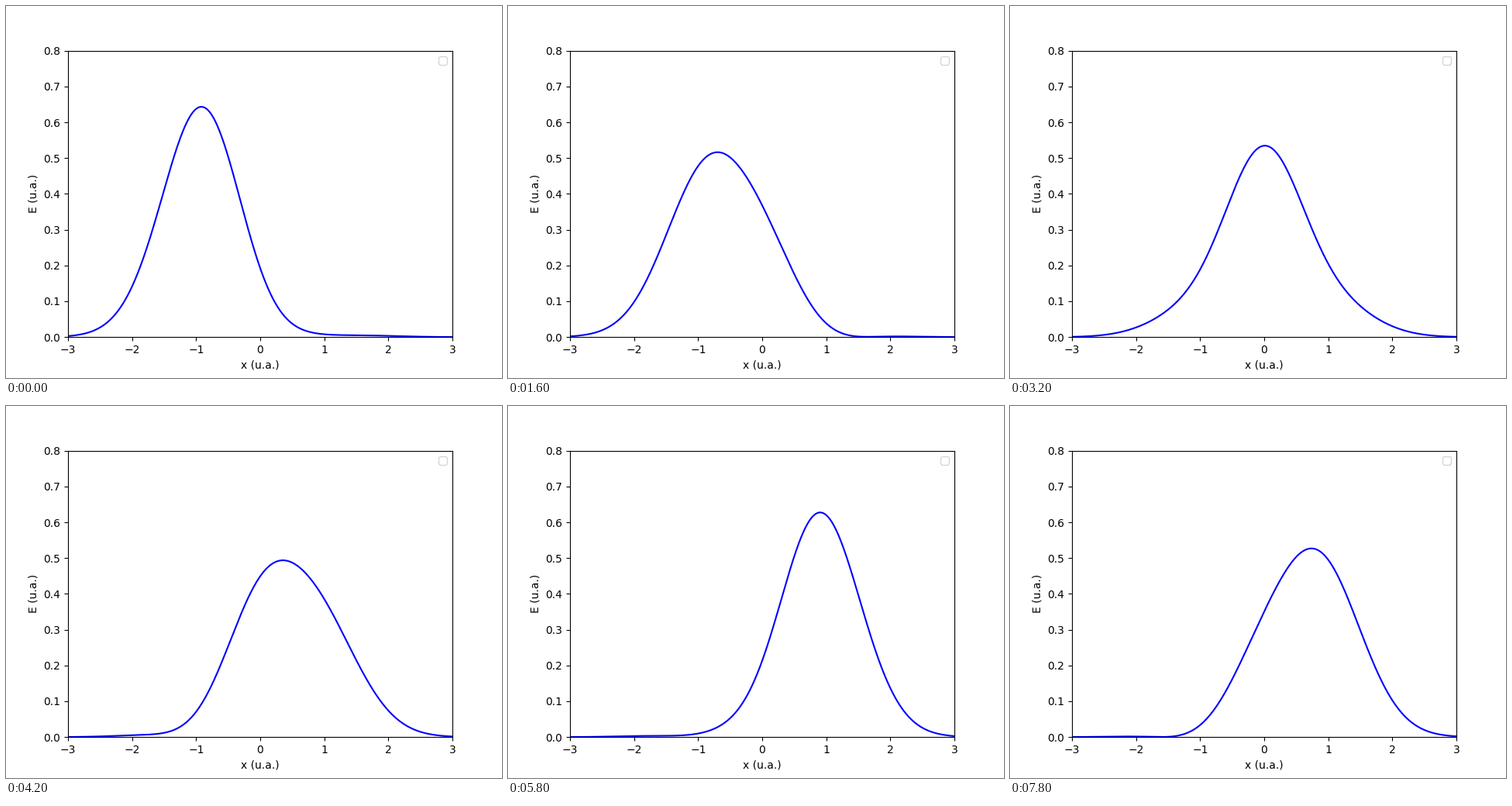
Write a matplotlib script that moves like this. It is 640x480 px and loops after 8 s.

```python
import math

import matplotlib.pyplot as plt
import numpy as np
from matplotlib.animation import FuncAnimation

FRAMES = 40
INTERVAL = 200
DT = 2 * math.pi / 63
ALPHA = -1 / math.sqrt(2)

x = np.linspace(-3, 3, 1000)

# First three eigenstates of the harmonic oscillator
phi0 = math.pi ** -0.25 * np.exp(-x**2 / 2)
states = [phi0, math.sqrt(2) * x * phi0, (2 * x**2 - 1) / math.sqrt(2) * phi0]


def density(t):
    """Probability density of a coherent state cut after three terms."""
    psi = sum(
        ALPHA**n / math.sqrt(math.factorial(n)) * phi * np.exp(-1j * n * t)
        for n, phi in enumerate(states)
    )
    return np.abs(math.exp(-ALPHA**2 / 2) * psi) ** 2


fig, ax = plt.subplots(figsize=(6.4, 4.8), dpi=100)
ax.set_xlim(-3, 3)
ax.set_ylim(0, 0.8)
ax.set_xlabel("x (u.a.)")
ax.set_ylabel("E (u.a.)")
ax.legend([], [], loc="upper right")
line, = ax.plot(x, density(0), color="blue", lw=1.5)


def update(i):
    line.set_ydata(density(i * DT))
    return line,


anim = FuncAnimation(fig, update, frames=FRAMES, interval=INTERVAL, repeat=True)
plt.show()
```
